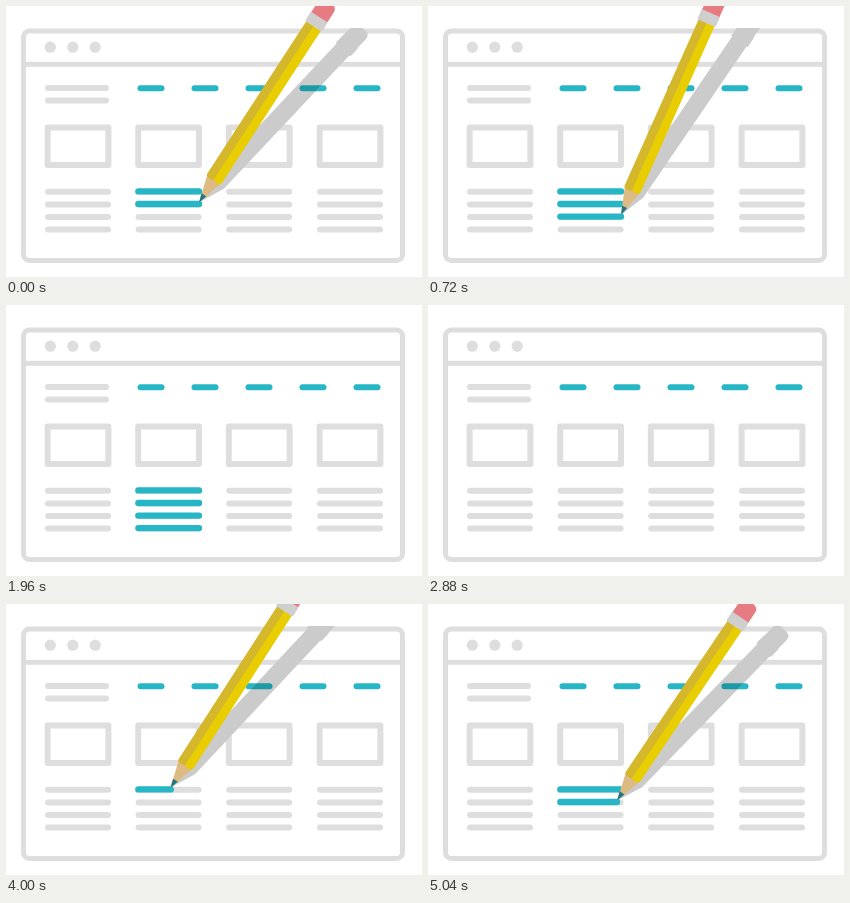
Recreate the animation shown at these times as an HTML page with a canvas. Size 416 by 271 pixels, loop 5080 ms.

```html
<!DOCTYPE html>
<html lang="en">
<head>
<meta charset="utf-8">
<title>Pencil writing on a page</title>
<style>
html, body { margin: 0; width: 100%; height: 100%; overflow: hidden; background: #fff; }
canvas { display: block; }
</style>
</head>
<body>
<canvas id="stage" width="416" height="271"></canvas>
<script>
const ctx = document.getElementById('stage').getContext('2d');
const LOOP = 5080;
const LEAD_IN = 2000; // how far into the writing cycle the loop begins

const GRAY = '#dedede', TEAL = '#26b6c5', SHADED_TEAL = '#1c9aa6', SHADOW = '#cbcbcb';
const COLUMNS = [42, 132.6, 223.2, 314];
const ROWS = [185.8, 198.4, 211, 223.5];
const LEFT = 132, RIGHT = 193;
const STROKE_STARTS = [600, 1400, 2120, 2840], STROKE_TIME = 600;
const SLIDE_START = 4280, SLIDE_TIME = 600, SLIDE_WIDTH = 363;
const SHADOW_TURN = 10.3;

const tipY = ROWS.map(y => y - 2);
// time, tip x, tip y, tilt in degrees
const POSES = [
  [0, 283, 415, 68],
  [600, LEFT, tipY[0], 28],
  [920, 164.5, tipY[0], 32.8],
  [1200, RIGHT, tipY[0], 27],
  [1400, LEFT, tipY[1], 26],
  [1960, 189, tipY[1], 34],
  [2000, RIGHT, tipY[1], 33],
  [2120, LEFT, tipY[2], 32],
  [2560, 177, tipY[2], 29.5],
  [2720, RIGHT, tipY[2], 24],
  [2840, LEFT, tipY[3], 26],
  [3120, 160, tipY[3], 30],
  [3320, 180.5, tipY[3], 28.3],
  [3440, RIGHT, tipY[3], 28],
  [3960, 283, 415, 68]
];

const clamp = v => Math.min(1, Math.max(0, v));
const easeInOut = v => (1 - Math.cos(Math.PI * v)) / 2;

function poseAt(time) {
  const next = POSES.findIndex(pose => pose[0] > time);
  if (next < 1) return null;
  const a = POSES[next - 1], b = POSES[next];
  const part = (time - a[0]) / (b[0] - a[0]);
  const [x, y, tilt] = [1, 2, 3].map(i => a[i] + (b[i] - a[i]) * part);
  return { x, y, tilt };
}

function line(x1, x2, y, color, width = 6) {
  ctx.strokeStyle = color;
  ctx.lineWidth = width;
  ctx.lineCap = 'round';
  ctx.beginPath();
  ctx.moveTo(x1, y);
  ctx.lineTo(x2, y);
  ctx.stroke();
}

function roundBox(x, y, w, h, radii, color) {
  ctx.fillStyle = color;
  ctx.beginPath();
  ctx.roundRect(x, y, w, h, radii);
  ctx.fill();
}

function polygon(points, color) {
  ctx.fillStyle = color;
  ctx.beginPath();
  points.forEach(p => ctx.lineTo(...p));
  ctx.fill();
}

// Pencil outline with its tip at the origin, pointing down
const outline = new Path2D('M0 0L-8.7 -27V-210H-10V-221H-9.5V-233Q-9.5 -239 -3.5 -239H3.5Q9.5 -239 9.5 -233V-221H10V-210H8.7V-27Z');

function drawPencil({ x, y, tilt }) {
  ctx.save();
  ctx.translate(x, y);
  ctx.rotate(tilt * Math.PI / 180);
  polygon([[0, 0], [-8.7, -30], [8.7, -30]], '#dcba82');
  polygon([[0, 0], [-2.8, -9], [2.8, -9]], '#237680');
  roundBox(-8.7, -211, 9.2, 185, [0, 0, 3, 3], '#d5b72b');
  roundBox(0, -211, 8.7, 185, [0, 0, 3, 3], '#e8cd00');
  roundBox(-9.5, -239, 19, 20, [6, 6, 0, 0], '#e67c81');
  roundBox(-10, -221, 20, 11, 1.5, '#cfcfcf');
  ctx.restore();
}

function shadowPath({ x, y, tilt }) {
  const path = new Path2D();
  path.addPath(outline, new DOMMatrix().translate(x, y).rotate(tilt + SHADOW_TURN));
  return path;
}

function drawWindow() {
  ctx.strokeStyle = GRAY;
  ctx.lineWidth = 5;
  ctx.beginPath();
  ctx.roundRect(17.5, 25, 379, 229.5, 6);
  ctx.stroke();
  ctx.fillStyle = GRAY;
  ctx.fillRect(17.5, 55.8, 379, 5);
  for (const x of [44.3, 66.8, 89.2]) {
    ctx.beginPath();
    ctx.arc(x, 41.2, 5.6, 0, 7);
    ctx.fill();
  }
  line(42, 100, 82, GRAY);
  line(42, 100, 94.4, GRAY);
  ctx.lineWidth = 6;
  ctx.lineJoin = 'round';
  for (const x of COLUMNS) ctx.strokeRect(x - 0.4, 121.4, 60.8, 37.6);
}

function drawText(shift) {
  for (const x of COLUMNS)
    for (const y of ROWS) line(x + shift, x + shift + 60, y, GRAY);
}

function drawTeal(time, shift, color) {
  for (let i = 0; i < 5; i++) line(134.5 + i * 54, 155.5 + i * 54, 82.2, color);
  ROWS.forEach((y, i) => {
    const drawn = clamp((time - STROKE_STARTS[i]) / STROKE_TIME);
    if (drawn > 0 && time < SLIDE_START + SLIDE_TIME)
      line(LEFT + 0.4 + shift, LEFT + 0.4 + shift + drawn * (RIGHT - LEFT - 0.4), y - 0.4, color, 6.4);
  });
}

function render(now) {
  const time = (now + LEAD_IN) % LOOP;
  const shift = easeInOut(clamp((time - SLIDE_START) / SLIDE_TIME)) * SLIDE_WIDTH;
  const pose = poseAt(time);
  const shadow = pose && shadowPath(pose);

  ctx.fillStyle = '#fff';
  ctx.fillRect(0, 0, 416, 271);
  drawWindow();

  ctx.save();
  ctx.beginPath();
  ctx.rect(20, 61, 374, 191);
  ctx.clip();
  drawText(shift);
  if (shift) drawText(shift - SLIDE_WIDTH);
  drawTeal(time, shift, TEAL);
  ctx.restore();

  if (pose) {
    // The shadow falls only on the window and darkens the teal marks
    ctx.save();
    ctx.beginPath();
    ctx.roundRect(15, 22, 384, 235, 8);
    ctx.clip();
    ctx.clip(shadow);
    ctx.fillStyle = SHADOW;
    ctx.fillRect(0, 0, 416, 271);
    drawTeal(time, shift, SHADED_TEAL);
    ctx.restore();
    drawPencil(pose);
  }
}

let start;
function tick(now) {
  start ??= now;
  render(now - start);
  requestAnimationFrame(tick);
}
render(0);
requestAnimationFrame(tick);
</script>
</body>
</html>
```
